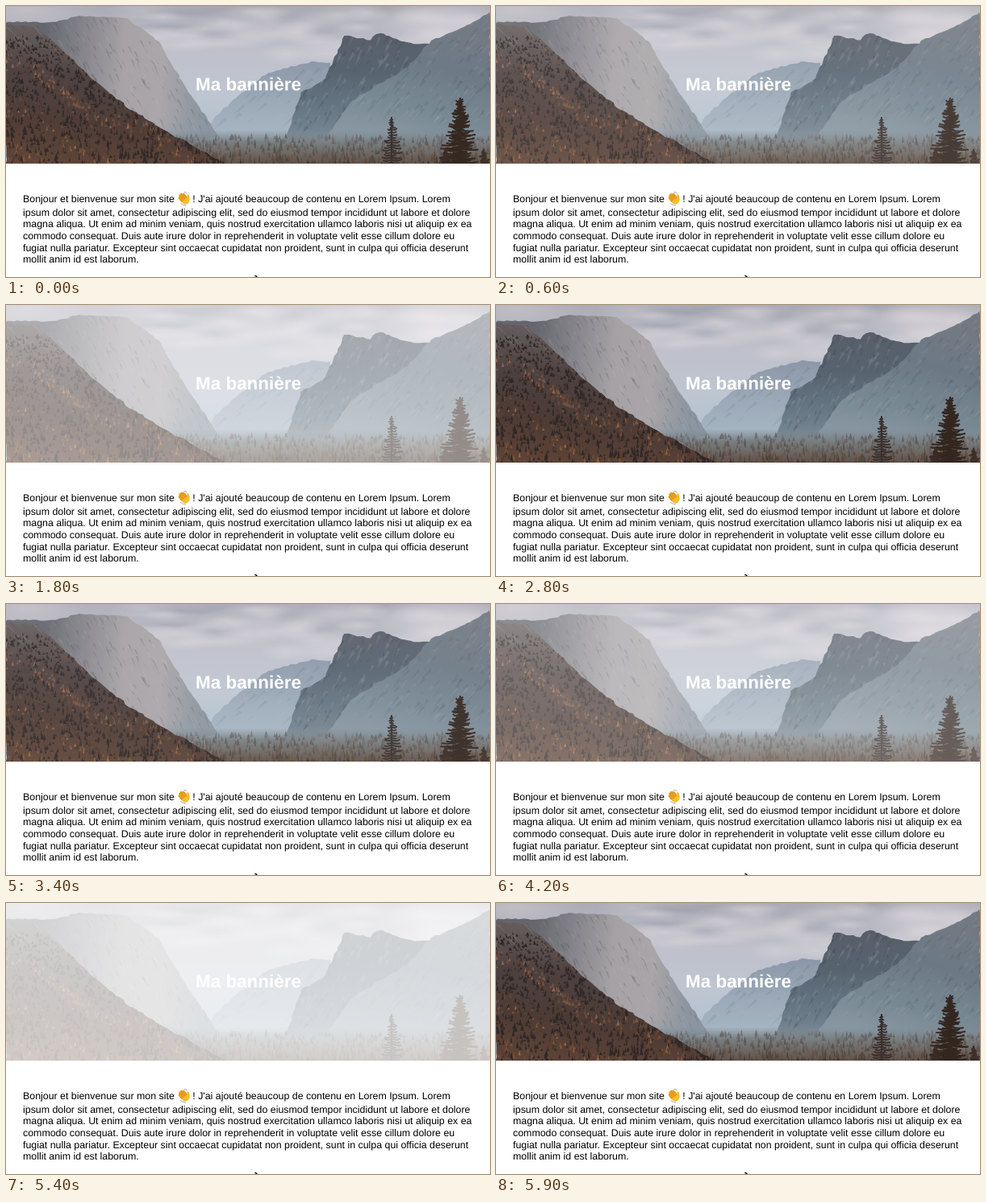
An HTML page with a canvas that plays this animation: 600x337 px, repeating every 6000 ms.

```html
<!DOCTYPE html>
<html lang="fr">
<head>
<meta charset="utf-8">
<title>Ma bannière</title>
<style>
  html, body { margin: 0; width: 100%; height: 100%; overflow: hidden; background: #fff; }
  body { position: relative; font-family: "Liberation Sans", Arial, sans-serif; }
  .banner { position: absolute; left: 0; top: 0; width: 600px; height: 196px; animation: fade 3s cubic-bezier(.42, 0, 1, 1) -.22s infinite; }
  @keyframes fade { from { opacity: 1; } to { opacity: .1; } }
  canvas, svg { position: absolute; left: 0; top: 0; display: block; }
  text { font-size: 12.38px; white-space: pre; text-rendering: geometricPrecision; }
  .title { font-size: 22.45px; font-weight: bold; fill: #fff; text-anchor: middle; }
</style>
</head>
<body>
<div class="banner">
  <canvas id="photo" width="600" height="196"></canvas>
  <svg width="600" height="196"><text class="title" x="300.5" y="105">Ma bannière</text></svg>
</div>
<svg width="600" height="337">
  <text x="21" y="244">Bonjour et bienvenue sur mon site <tspan x="231.3">! J'ai ajouté beaucoup de contenu en Lorem Ipsum. Lorem</tspan></text>
  <text y="260.7"><tspan x="21">ipsum dolor sit amet, consectetur adipiscing elit, sed do eiusmod tempor incididunt ut labore et dolore</tspan><tspan x="21" dy="14.6">magna aliqua. Ut enim ad minim veniam, quis nostrud exercitation ullamco laboris nisi ut aliquip ex ea</tspan><tspan x="21" dy="14.6">commodo consequat. Duis aute irure dolor in reprehenderit in voluptate velit esse cillum dolore eu</tspan><tspan x="21" dy="14.6">fugiat nulla pariatur. Excepteur sint occaecat cupidatat non proident, sunt in culpa qui officia deserunt</tspan><tspan x="21" dy="14.6">mollit anim id est laborum.</tspan></text>
  <path d="M307.5 335h2.6l2 2h-2z"/>
  <!-- waving hand -->
  <g transform="translate(220.5 240) rotate(-38)" stroke-linecap="round" fill="none">
    <path id="fingers" d="M-3.4 0v-4.5M-1.2 0v-6.3M1.1 0v-6.5M3.3 0v-5" stroke="#e69c1c" stroke-width="2.6"/>
    <path d="M-4.2-.5h8.2l.3 2 2-2.6q1.4-.5 1.3.9L5.200 4.500Q3.500 7 0 7q-3.600-.4-4.200-4z" fill="#fabf2a" stroke="#eba722" stroke-width=".6"/>
    <use href="#fingers" style="stroke: #fcc834" stroke-width="1.6"/>
    <path d="M-6.500 2q.4 3.600 3.200 5.600M5.500-6.500q1.800 1 2 3" stroke="#8b8b8b" stroke-width=".7"/>
  </g>
</svg>
<script>
const ctx = document.getElementById('photo').getContext('2d');

let seed = 11;
const rand = (a = 0, b = 1) => {
  seed = (seed * 1664525 + 1013904223) >>> 0;
  return a + (b - a) * seed / 4294967296;
};

const repeat = (n, draw) => { for (let i = 0; i < n; i++) draw(i / n); };

function grad(x0, y0, x1, y1, ...colors) {
  const g = ctx.createLinearGradient(x0, y0, x1, y1);
  colors.forEach((c, i) => g.addColorStop(i / (colors.length - 1), c));
  return g;
}

// Closed outline through a few corners, its edges broken up like rock.
function crag(corners, rough) {
  const path = new Path2D();
  corners.forEach(([x, y], i) => {
    const [u, v] = corners[(i + 1) % corners.length];
    const steps = Math.ceil(Math.hypot(u - x, v - y) / 5);
    repeat(steps, t => path.lineTo(x + (u - x) * t + rand(-rough, rough), y + (v - y) * t + rand(-rough, rough)));
  });
  path.closePath();
  return path;
}

function rock(path, paint, detail) {
  ctx.save();
  ctx.fillStyle = paint;
  ctx.fill(path);
  ctx.clip(path);
  detail();
  ctx.restore();
}

// Soft elliptical patch of one "r,g,b" colour.
function puff(x, y, rx, ry, rgb, alpha) {
  ctx.save();
  ctx.translate(x, y);
  ctx.scale(rx, ry);
  const g = ctx.createRadialGradient(0, 0, 0, 0, 0, 1);
  g.addColorStop(0, `rgba(${rgb},${alpha})`);
  g.addColorStop(1, `rgba(${rgb},0)`);
  ctx.fillStyle = g;
  ctx.fillRect(-1, -1, 2, 2);
  ctx.restore();
}

// Small slanted facets of shade and light; lean is the sideways drift.
function facets(n, x0, x1, y0, y1, lean, alpha) {
  repeat(n, () => {
    const x = rand(x0, x1), y = rand(y0, y1), h = rand(4, 16), w = rand(1, 4);
    ctx.fillStyle = rand() < .55 ? `rgba(44,50,60,${alpha})` : `rgba(205,200,200,${alpha * .8})`;
    ctx.beginPath();
    ctx.moveTo(x, y);
    ctx.lineTo(x + w, y + rand(0, 4));
    ctx.lineTo(x + lean * h + w * rand(), y + h);
    ctx.fill();
  });
}

function spire(x, y, w, h, color) {
  ctx.fillStyle = color;
  ctx.beginPath();
  ctx.moveTo(x, y - h);
  ctx.lineTo(x + w, y);
  ctx.lineTo(x - w, y);
  ctx.fill();
}

// Tall conifer with ragged branches.
function conifer(x, top, width, gap, color) {
  ctx.strokeStyle = color;
  ctx.lineWidth = 2;
  ctx.beginPath();
  ctx.moveTo(x, top);
  ctx.lineTo(x, 196);
  for (let y = top + 3; y < 198; y += gap) {
    const reach = width * Math.min(1, .15 + 1.1 * (y - top) / (196 - top));
    for (const side of [-1, 1]) {
      const r = side * reach * rand(.3, 1);
      ctx.moveTo(x, y - 1);
      ctx.quadraticCurveTo(x + r * .6, y + 2, x + r, y + rand(-2, 1));
    }
  }
  ctx.stroke();
}

function sky() {
  ctx.fillStyle = grad(0, 0, 0, 165, '#acacb6', '#bfc0ca', '#bec6d1', '#b0c0cd');
  ctx.fillRect(0, 0, 600, 196);
  repeat(14, () => puff(rand(160, 480), rand(0, 35), rand(25, 60), rand(5, 11), '140,146,160', .35));
  repeat(34, t => puff(170 + 430 * t, rand(5, 65), rand(25, 55), rand(7, 16), '222,217,221', .45));
  puff(25, 5, 80, 22, '205,200,204', .6);
  puff(540, 18, 90, 26, '224,219,223', .7);
}

function farRange() {
  const ridge = crag([[240, 170], [260, 137], [300, 102], [325, 83], [378, 69], [402, 71], [400, 170]], 1);
  rock(ridge, grad(0, 68, 0, 165, '#8b97a8', '#9aa8b7', '#a8b7c4'), () => facets(50, 260, 400, 75, 140, -1, .08));
}

function leftCliff() {
  const cliff = crag([[0, 20], [62, 20], [90, 12], [150, 15], [190, 44], [206, 74], [232, 115], [264, 162], [190, 175], [0, 150]], 1);
  rock(cliff, grad(45, 60, 245, 75, '#65666d', '#85848a', '#a5a1a4', '#a9a5a8', '#8b949e'), () => {
    facets(420, 50, 250, 5, 150, .45, .17);
    puff(232, 165, 60, 26, '140,154,167', .6);
  });
}

function rightCliff() {
  const back = crag([[344, 172], [366, 108], [396, 90], [420, 37], [451, 42], [463, 33], [502, 47], [600, 45], [600, 180]], 1.2);
  rock(back, grad(0, 35, 0, 175, '#585e69', '#56636f', '#667683', '#7d8c97'), () => facets(260, 345, 500, 30, 150, -.5, .15));

  const front = crag([[385, 180], [428, 118], [498, 76], [528, 43], [580, 20], [600, 8], [600, 190]], 1);
  rock(front, grad(540, 22, 500, 175, '#727983', '#6c7985', '#778792', '#8695a0'), () => {
    facets(220, 430, 610, 15, 140, -.8, .1);
    puff(450, 160, 100, 30, '138,152,163', .5);
  });
}

function valley() {
  ctx.fillStyle = grad(0, 155, 0, 196, 'rgba(126,140,149,.1)', '#788083', '#6e6965', '#604f48');
  ctx.fillRect(180, 155, 420, 41);
  repeat(700, t => {
    const warm = rand(0, 45) * t, k = 112 - 52 * t + rand(-12, 12);
    spire(rand(195, 605), 164 + 38 * t, rand(1, 2.2), rand(4, 8 + 5 * t), `rgb(${k + warm},${k + warm * .3},${k + 4 - 12 * t})`);
  });
}

// Forest in diagonal bands, dark gullies between rust-coloured trees.
function leftSlope() {
  const slope = crag([[0, 22], [38, 26], [74, 58], [110, 93], [152, 127], [206, 160], [275, 197], [0, 197]], 1.2);
  rock(slope, grad(60, 30, 40, 196, '#655d5d', '#4c4140', '#4d3b35', '#5f4336'), () => {
    repeat(1900, t => {
      const x = rand(0, 275), y = 40 + 160 * t;
      const band = Math.sin((y - x * .55) / 9 + Math.sin(x / 23)) + rand(-1.3, 1.3);
      const k = Math.max(0, band);
      spire(x, y, rand(.8, 2.4), rand(2, 5 + 5 * t), `rgb(${48 + 46 * k},${40 + 27 * k},${39 + (20 - 10 * t) * k})`);
    });
    facets(70, 0, 70, 20, 55, .9, .2);
  });
}

sky();
farRange();
leftCliff();
rightCliff();
valley();
leftSlope();
conifer(478, 138, 15, 3.2, '#3a302e');
conifer(563, 114, 25, 1.8, '#33261f');
conifer(545, 176, 9, 2, '#3a2a24');
conifer(592, 178, 9, 2, '#3f2e27');
</script>
</body>
</html>
```
